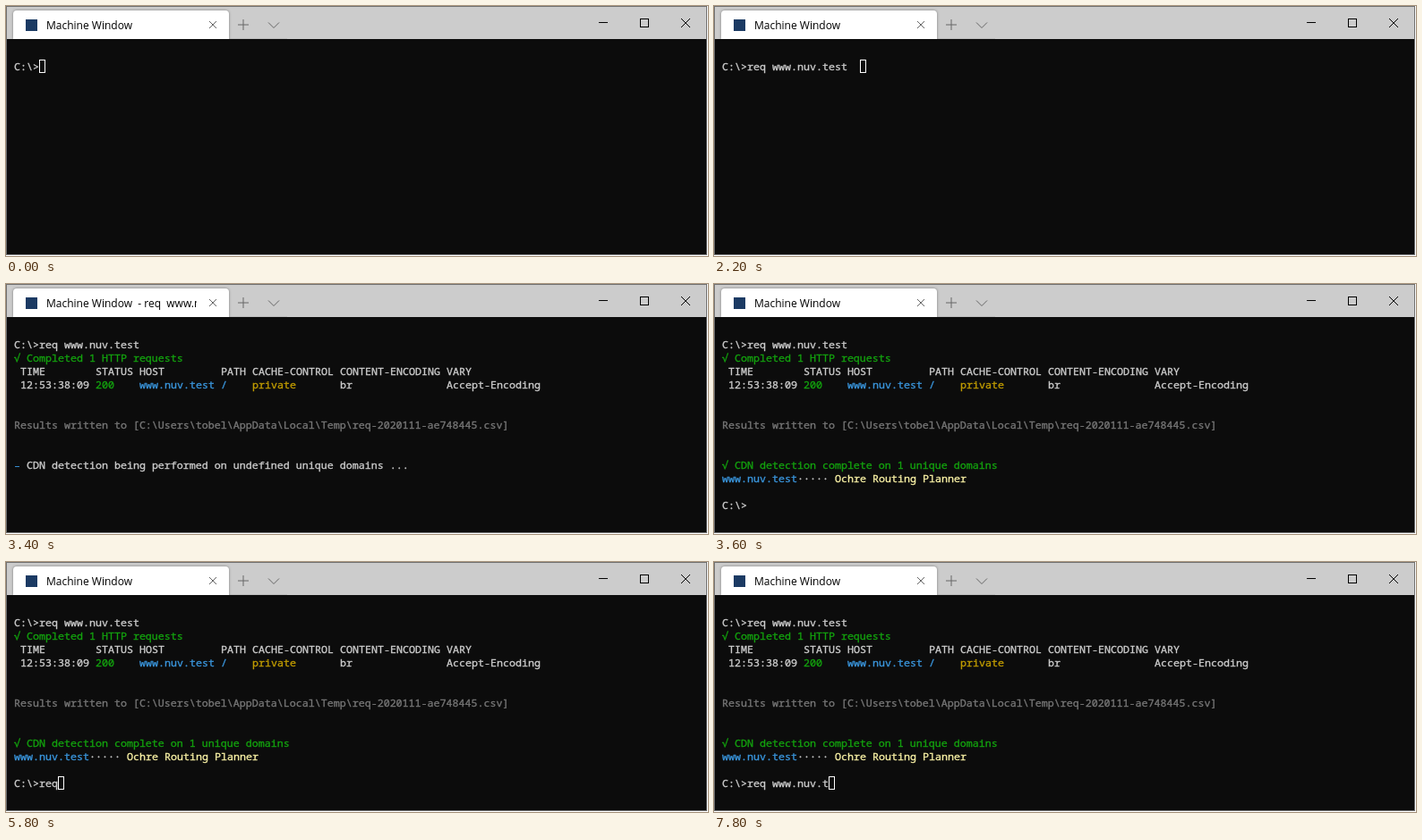
Recreate the animation shown at these times as an HTML page. Size 784 by 280 pixels, loop 8 s.

```html
<!DOCTYPE html>
<html lang="en">
<head>
<meta charset="utf-8">
<title>Terminal</title>
<style>
  html, body { margin: 0; width: 100%; height: 100%; overflow: hidden; background: #fff; }
  svg { display: block; width: 784px; height: 280px; }
  text { white-space: pre; }
  .screen text {
    font: 11.667px "Noto Sans Mono", "DejaVu Sans Mono", monospace;
    fill: currentColor; stroke: currentColor; stroke-width: .35px;
  }
  .title { font: 12px "Open Sans", "Noto Sans", sans-serif; fill: #000; }
  .tab { fill: #fff; filter: drop-shadow(0 0 1.5px #0006); }
  .line { fill: none; stroke: #000; }
  .soft { stroke: #666; }
</style>
</head>
<body>
<svg viewBox="0 0 784 280">
  <defs>
    <clipPath id="titleClip"><rect x="45" y="8" width="168" height="26"/></clipPath>
  </defs>

  <rect width="783" height="37" fill="#ccc"/>
  <path d="M249 36.5H314" stroke="#bdbdbd"/>
  <path class="tab" d="M8 37V9Q8 5 12 5H245Q249 5 249 9V37Z"/>
  <rect y="37" width="783" height="242" fill="#0c0c0c"/>
  <rect x="22" y="15" width="13" height="13" fill="#1b3a63"/>
  <text class="title" id="title" x="45" y="26" clip-path="url(#titleClip)"></text>

  <path class="line soft" d="M227 17L235 25M235 17L227 25"/>
  <path class="line soft" d="M259 21H271M265 15V27"/>
  <path class="line soft" d="M293 18.5L299 24.5L305 18.5"/>
  <path class="line" d="M662 18.5H672"/>
  <rect class="line" x="708.5" y="14.5" width="9" height="9"/>
  <path class="line" d="M754 14L764 24M764 14L754 24"/>

  <g class="screen" id="screen"></g>
  <rect id="cursor" width="6" height="14" fill="none" stroke="#fff"/>
  <rect x=".5" y=".5" width="782" height="278" fill="none" stroke="#707070"/>
</svg>

<script>
const LOOP = 8000, LEFT = 9, TOP = 60, CELL_W = 7, CELL_H = 15;
const color = {
  text: '#ccc', green: '#13a10e', blue: '#3a96dd',
  yellow: '#c19c00', pale: '#f9f1a5', dim: '#767676'
};
const prompt = 'C:\\>', host = 'www.nuv.test', tool = 'req';
const command = `${tool} ${host}`;
const appTitle = 'Machine Window';

const TYPING = 0, RUNNING = 1, DETECTING = 2, DONE = 3;
const cursorRow = [0, 1, 9, 12];

// time, phase, typed characters, cursor column (-1 hides it)
const steps = [
  [0, TYPING, 0, 4],
  [400, TYPING, 0, -1],
  [1000, TYPING, 1, 5],
  [1600, TYPING, 6, 10],
  [1800, TYPING, 13, 17],
  [2000, TYPING, 17, 21],
  [2200, TYPING, 18, 22],
  [2400, TYPING, 19, 23],
  [2800, RUNNING, 19, 0],
  [3200, RUNNING, 19, -1],
  [3400, DETECTING, 19, -1],
  [3600, DONE, 0, -1],
  [4000, DONE, 0, 4],
  [4600, DONE, 1, 5],
  [5200, DONE, 2, 6],
  [5800, DONE, 3, 7],
  [6000, DONE, 4, 8],
  [6400, DONE, 6, 10],
  [6600, DONE, 7, 11],
  [6800, DONE, 9, 13],
  [7400, DONE, 10, 14],
  [7600, DONE, 12, 16],
  [7800, DONE, 13, 17]
];

const byId = id => document.getElementById(id);
const screenGroup = byId('screen'), cursor = byId('cursor'), title = byId('title');

function group() {
  return screenGroup.appendChild(document.createElementNS(screenGroup.namespaceURI, 'g'));
}

function write(parent, row, col, string, tone = 'text') {
  const node = document.createElementNS(screenGroup.namespaceURI, 'text');
  node.setAttribute('x', LEFT + col * CELL_W);
  node.setAttribute('y', TOP + 12 + row * CELL_H);
  node.style.color = color[tone];
  node.textContent = string;
  return parent.appendChild(node);
}

const firstLine = write(screenGroup, 0, 0, prompt);

const results = group();
write(results, 1, 0, '√ Completed 1 HTTP requests', 'green');
[
  [1, 'TIME', '12:53:38:09'],
  [13, 'STATUS', '200', 'green'],
  [20, 'HOST', host, 'blue'],
  [33, 'PATH', '/', 'blue'],
  [38, 'CACHE-CONTROL', 'private', 'yellow'],
  [52, 'CONTENT-ENCODING', 'br'],
  [69, 'VARY', 'Accept-Encoding']
].forEach(([col, heading, value, tone]) => {
  write(results, 2, col, heading);
  write(results, 3, col, value, tone);
});
write(results, 6, 0,
  `Results written to [C:\\Users\\tobel\\AppData\\Local\\Temp\\${tool}-2020111-ae748445.csv]`, 'dim');

const detecting = group();
write(detecting, 9, 0, '–', 'blue');
write(detecting, 9, 2, 'CDN detection being performed on undefined unique domains ...');

const done = group();
write(done, 9, 0, '√ CDN detection complete on 1 unique domains', 'green');
write(done, 10, 0, host, 'blue');
write(done, 10, 12, '·····');
write(done, 10, 18, 'Ochre Routing Planner', 'pale');
const secondLine = write(done, 12, 0, prompt);

const show = (node, visible) => { node.style.display = visible ? '' : 'none'; };

function render(step) {
  const [, phase, typed, col] = step;
  const line = prompt + command.slice(0, typed);
  firstLine.textContent = phase === DONE ? prompt + command : line;
  secondLine.textContent = line;
  show(results, phase >= DETECTING);
  show(detecting, phase === DETECTING);
  show(done, phase === DONE);
  const busy = phase === RUNNING || phase === DETECTING;
  title.textContent = busy ? `${appTitle}  - ${tool}  ${host}` : appTitle;
  show(cursor, col >= 0);
  cursor.setAttribute('x', LEFT + col * CELL_W + .5);
  cursor.setAttribute('y', TOP + cursorRow[phase] * CELL_H + .5);
}

const start = performance.now();
let current;

function tick() {
  const time = Math.max(0, performance.now() - start) % LOOP;
  const step = steps.findLast(([at]) => at <= time);
  if (step !== current) render(current = step);
  requestAnimationFrame(tick);
}
tick();
</script>
</body>
</html>
```
